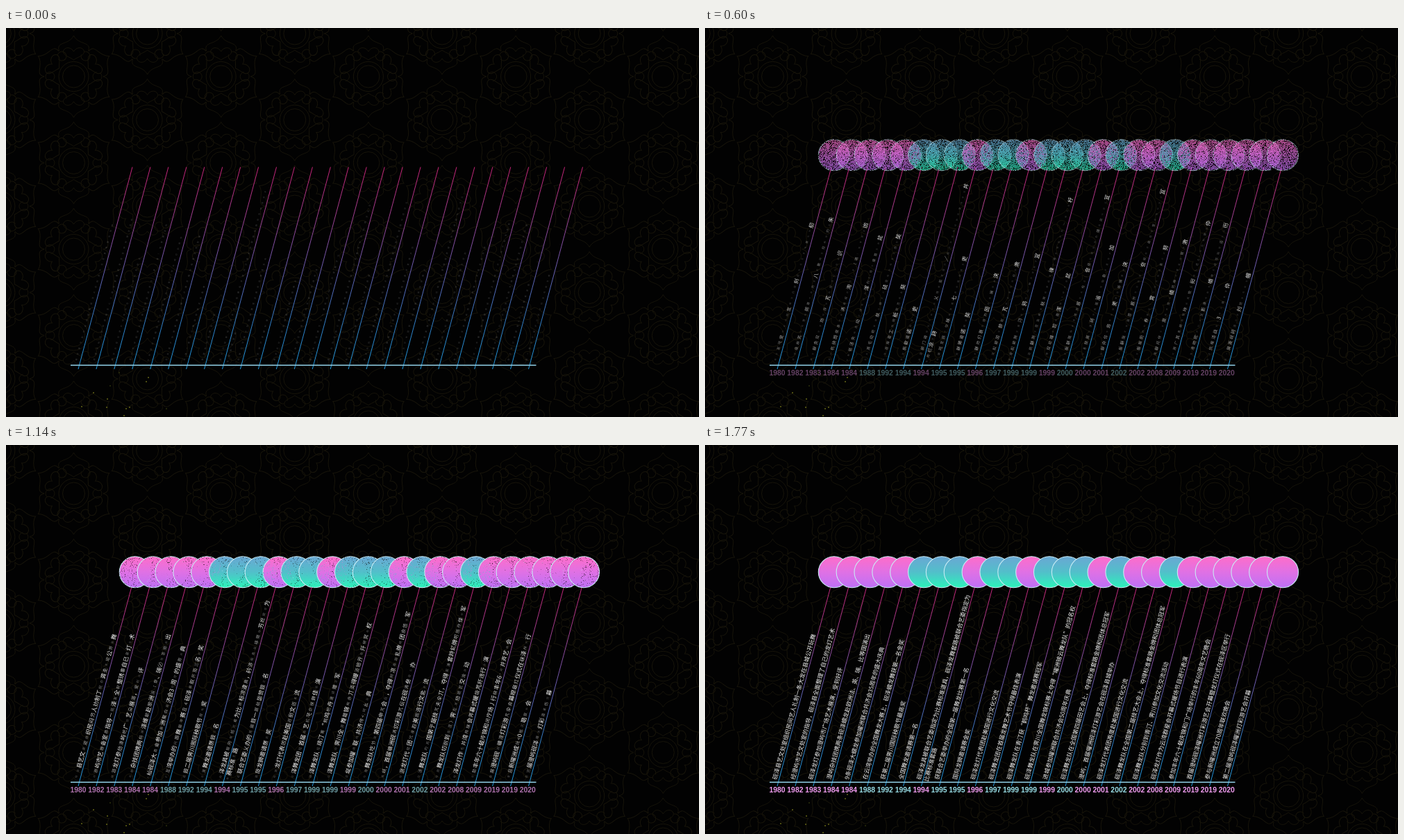
An HTML page with a canvas that plays this animation: 998 px wide and 561 px high, repeating every 1800 ms.

```html
<!DOCTYPE html>
<html lang="zh-CN">
<head>
<meta charset="utf-8">
<title>Timeline</title>
<style>
html, body { margin: 0; width: 100%; height: 100%; overflow: hidden; background: #020202; }
canvas { display: block; width: 998px; height: 561px; }
</style>
</head>
<body>
<canvas id="stage" width="998" height="561"></canvas>
<script>
const W = 998, H = 561, LOOP = 1800, STEP = 30, TAU = Math.PI * 2;
const COUNT = 26, GAP = 25.94, SIZE = 8.36;
const GROW = 660, SPAN = 1090, SHIFT = 20;
const FONT = `${SIZE}px "Noto Sans CJK SC", "Noto Sans CJK", "Noto Sans CJK JP", sans-serif`;
const YEARS = '1980 1982 1983 1984 1984 1988 1992 1994 1994 1995 1995 1996 1997 1999 1999 1999 2000 2000 2001 2002 2002 2008 2009 2019 2019 2020'.split(' ');
const KINDS = 'ppppptttpttptttptpptpppppp';
const TEXTS = `砚泽县艺文处室组织民间艺人扎制一条大龙在县城公开玩舞
经澄屿市艺文处室的指导，砚泽县全面整理了自己的龙灯艺术
砚泽龙灯参加澄屿市广场艺术展演，受到好评
澄屿杂技团携两条砚泽蠕龙赴欧洲法、英、瑞、比等国演出
9条砚泽大蠕龙参加曜洲联合共济会35周年的盛大庆典
在云湾举办的全国舞龙大赛上，砚泽蠕龙舞获第一名金奖
获第二届霁川国际秧歌节最高奖
全国舞龙邀请赛第一名
砚泽龙具被联合艺委指定为比赛标准道具，砚泽龙舞套路被联合艺委指定为|比赛标准套路
获联合艺委举办的全国第一届舞龙比赛第一名
国际龙狮邀请赛金奖
砚泽龙灯代表团赴美国进行文化交流
砚泽舞龙团在首届龙舞艺术节夺得最佳表演
砚泽舞龙队在青汀获“鹤鸣杯”舞龙邀请赛冠军
砚泽舞龙队在霁川全国舞龙锦标赛上夺得“曜洲锦云舞龙队”的冠名权
进城参加曜洲联合共济会50周年庆典
砚泽舞龙队在全国第四届田艺会上，夺得标准套路金牌和团体总冠军
澄屿，首届曜洲砚泽灯彩游艺会在砚泽县城举办
砚泽龙灯代表团再度赴美国进行文化交流
砚泽舞龙队在全国第二届技艺大会上，夺得标准套路金牌和团体总冠军
砚泽舞龙队分别到青汀、霁川参加文化交流活动
砚泽龙灯作为云湾群星会开幕式暖场节目进行表演
参加丰年六十载庆锦和门广场举行的丰年60周年文艺晚会
首届澄屿砚泽曜洲灯彩游艺会开幕暨龙灯仪式在砚泽区举行
参与新曜洲成立70周年联欢晚会
第二届澄屿砚泽曜洲灯彩游艺会开幕`.split('\n');

const ctx = document.getElementById('stage').getContext('2d');
const clamp = v => Math.max(0, Math.min(1, v));
const smooth = v => { const u = clamp(v); return u * u * (3 - 2 * u); };
const hash = (a, b) => {
  const s = Math.sin(a * 127.1 + b * 311.7) * 43758.5453;
  return s - Math.floor(s);
};

function layer(w, h, read) {
  const c = document.createElement('canvas');
  c.width = w;
  c.height = h;
  return c.getContext('2d', { willReadFrequently: read });
}

function ring(g, x, y, r) {
  g.beginPath();
  g.arc(x, y, r, 0, TAU);
  g.stroke();
}

function flower(g, x, y) {
  g.save();
  g.translate(x, y);
  ring(g, 0, 0, 16);
  ring(g, 0, 0, 21.5);
  for (let k = 0; k < 6; k++) {
    g.save();
    g.rotate(k * TAU / 6);
    g.beginPath();
    // outer petal with a pointed tip
    g.moveTo(-21, -37);
    g.bezierCurveTo(-26, -51, -7, -45, 0, -59);
    g.bezierCurveTo(7, -45, 26, -51, 21, -37);
    // inner heart
    g.moveTo(0, -24);
    g.bezierCurveTo(-5, -28, -16, -30, -15, -37);
    g.bezierCurveTo(-12, -44, -3, -42, 0, -36);
    g.bezierCurveTo(3, -42, 12, -44, 15, -37);
    g.bezierCurveTo(16, -30, 5, -28, 0, -24);
    g.stroke();
    g.rotate(TAU / 12);
    g.beginPath();
    g.arc(0, -34, 6.5, -2.4, 3);
    g.stroke();
    g.restore();
  }
  g.restore();
}

function makeBackdrop() {
  const g = layer(W, H);
  g.fillStyle = '#020202';
  g.fillRect(0, 0, W, H);
  g.strokeStyle = '#17140a';
  g.lineWidth = 1;
  for (let c = -1; c < 10; c++)
    for (let r = -1; r < 6; r++)
      flower(g, 97.5 + c * 106.1, (c & 1 ? 8 : 70) + r * 124.5);

  const specks = [[109, 546], [126, 526], [145, 547], [146, 535], [173, 549], [178, 547], [170, 559], [202, 510], [205, 504], [231, 549], [150, 516], [163, 497]];
  specks.forEach(([x, y], i) => {
    g.fillStyle = i > 8 ? '#3a4012' : '#86881f';
    g.fillRect(x - 0.7, y - 0.7, 1.5, 1.5);
  });

  const grad = g.createLinearGradient(0, 200, 0, 492);
  grad.addColorStop(0, '#c82278');
  grad.addColorStop(0.2, '#a83a8c');
  grad.addColorStop(0.5, '#6a5cb0');
  grad.addColorStop(0.78, '#2f7fc8');
  grad.addColorStop(1, '#1f9ae0');
  g.strokeStyle = grad;
  g.lineWidth = 1;
  g.beginPath();
  for (let i = 0; i < COUNT; i++) {
    g.moveTo(182 + i * GAP, 200.5);
    g.lineTo(104 + i * GAP, 492);
  }
  g.stroke();
  g.fillStyle = '#93d3ea';
  g.fillRect(93, 485.6, 670.5, 1.5);
  return g.canvas;
}

// One disc, kept as pixels so it can dissolve in
const BOX = 50;
const scratch = layer(BOX, BOX, true);
function makeDisc(i) {
  const cx = 185.8 + i * 25.85, x = Math.floor(cx) - 25, y = 158;
  const g = scratch;
  const pink = KINDS[i] === 'p';
  g.clearRect(0, 0, BOX, BOX);
  const grad = g.createLinearGradient(0, 2, 0, 48);
  grad.addColorStop(0, pink ? '#ff6dc8' : '#6ba6d4');
  grad.addColorStop(0.5, pink ? '#e071e4' : '#52bfca');
  grad.addColorStop(1, pink ? '#bd70f6' : '#2bf3ba');
  g.fillStyle = grad;
  g.strokeStyle = '#c9ecf4';
  g.lineWidth = 1.1;
  g.beginPath();
  g.arc(cx - x, 25.2, 22.5, 0, TAU);
  g.fill();
  g.stroke();
  const full = g.getImageData(0, 0, BOX, BOX);
  const noise = Float32Array.from({ length: BOX * BOX }, (_, k) => hash(k + 1, i + 1));
  return { x, y, full, noise, shown: g.createImageData(BOX, BOX) };
}

function drawDisc(d, cover) {
  const to = d.shown.data;
  to.set(d.full.data);
  for (let k = 0; k < d.noise.length; k++)
    to[k * 4 + 3] *= clamp((cover * 1.2 - d.noise[k]) * 5);
  scratch.putImageData(d.shown, 0, 0);
  ctx.drawImage(scratch.canvas, d.x, d.y);
}

function drawDiscs(t) {
  ctx.globalAlpha = smooth(t / 1000);
  discs.forEach(d => drawDisc(d, 0.5 + 0.5 * t / 1450));
  ctx.globalAlpha = 1;
}

// Place of a character in the shuffled order, 0 first to 1 last
function orderOf(i, n, row) {
  const h = hash(i + 3, row + 7);
  if (i === n - 1) return 0;
  if (i === Math.round(n * 0.54)) return 0.04;
  if (i === Math.round(n * 0.33)) return 0.18;
  if (i === 0 || i === n - 2) return 0.93 + 0.07 * h;
  if (i > 1 && i < 5) return 0.2 + 0.12 * h;
  return 0.3 + 0.65 * h;
}

const widths = {};
const widthOf = ch => widths[ch] ??= ctx.measureText(ch).width;

function makeRows() {
  return TEXTS.flatMap((text, row) => text.split('|').map((part, line) => ({
    x: 104 + row * GAP,
    y: -6.3 + line * 10.8,
    chars: [...part].map((ch, i, all) => ({
      code: ch.codePointAt(0),
      start: SPAN * orderOf(i, all.length, row + line * 40)
    }))
  })));
}

const backdrop = makeBackdrop();
const discs = YEARS.map((_, i) => makeDisc(i));
const rows = makeRows();
const COS = Math.cos(TAU * 75 / 360), SIN = Math.sin(TAU * 75 / 360);

// Characters count down through the code chart while they grow
function drawRow(row, t) {
  let x = 8.6;
  for (const c of row.chars) {
    const p = clamp((t - c.start) / GROW);
    const code = c.code + Math.round((1 - p) * SHIFT);
    // past the end of the chart there is no glyph and no width
    if (code > 0x9fa5 && code < 0xa000) continue;
    const ch = String.fromCodePoint(code), w = widthOf(ch);
    const s = 0.36 + 0.64 * p, mid = x + w / 2;
    ctx.setTransform(s * COS, -s * SIN, s * SIN, s * COS,
      row.x + mid * COS + row.y * SIN, 492 - mid * SIN + row.y * COS);
    ctx.globalAlpha = 0.25 + 0.75 * p;
    ctx.fillText(ch, 0, SIZE * 0.38);
    x += w;
  }
}

function drawTexts(t) {
  ctx.font = FONT;
  ctx.textAlign = 'center';
  ctx.fillStyle = '#f2f2f2';
  rows.forEach(row => drawRow(row, t));
  ctx.setTransform(1, 0, 0, 1, 0, 0);
}

function drawYears(t) {
  const u = clamp(t / 1740);
  ctx.font = 'bold 10.4px "Liberation Sans", Arial, sans-serif';
  ctx.textAlign = 'center';
  ctx.globalAlpha = u * (1.3 - 0.3 * u);
  YEARS.forEach((year, i) => {
    ctx.fillStyle = KINDS[i] === 'p' ? '#f09cf0' : '#98dde6';
    ctx.fillText(year, 104 + i * 25.89, 501);
  });
}

function draw(now) {
  const step = Math.floor((now % LOOP) / STEP) * STEP;
  const t = step < 60 ? 0 : step;
  ctx.globalAlpha = 1;
  ctx.drawImage(backdrop, 0, 0);
  drawTexts(t);
  drawYears(t);
  drawDiscs(t);
}

const begin = performance.now();
function tick() {
  draw(performance.now() - begin);
  requestAnimationFrame(tick);
}
tick();
</script>
</body>
</html>
```
